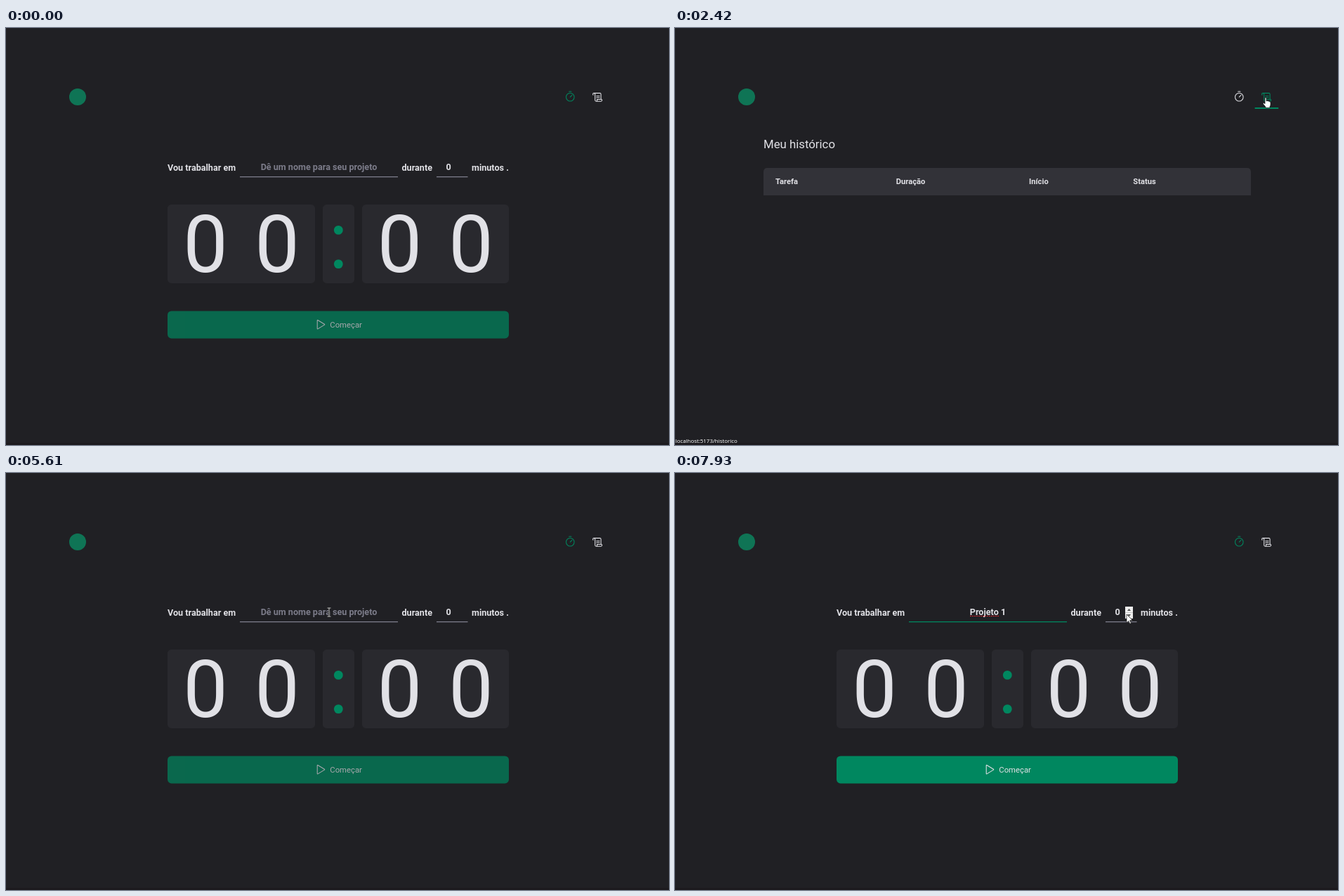
An HTML page that plays this animation: 944x593 px, repeating every 8000 ms.

```html
<!DOCTYPE html>
<html lang="pt-BR">
<head>
<meta charset="utf-8">
<title>Timer</title>
<style>
html, body { margin: 0; height: 100%; overflow: hidden; background: #202024; }
svg { display: block; width: 944px; height: 593px; font: 12.6px Roboto, sans-serif; fill: #e1e1e6; }
.bold { font-weight: 700; }
.mid { text-anchor: middle; }
.icon { fill: none; stroke: #e1e1e6; stroke-width: 16; stroke-linecap: round; stroke-linejoin: round; }
.icon.active { stroke: #00875f; }
.card { fill: #29292e; }
.green { fill: #00875f; }
.gray { fill: #7c7c8a; }
.digits { font-size: 113px; }
.ui { font-family: "Open Sans", "Noto Sans", sans-serif; fill: #fff; }
</style>
</head>
<body>
<svg viewBox="0 0 944 593">
  <rect y="590" width="944" height="3" fill="#1c1a1e"/>
  <circle cx="102" cy="98" r="12" fill="#0f7455"/>

  <g id="timerIcon" class="icon" transform="translate(794.9 89.8) scale(.0656)">
    <circle cx="128" cy="128" r="88"/>
    <path d="M128 128L167.6 88.4M104 8H152"/>
  </g>
  <g id="scrollIcon" class="icon" transform="translate(834 90) scale(.0656)">
    <path d="M104 104H168M104 136H168M48 40H176a24 24 0 0 1 24 24V176M32 80s-8-6-8-16a24 24 0 0 1 48 0V192a24 24 0 0 0 48 0c0-10-8-16-8-16H216s8 6 8 16a24 24 0 0 1-24 24H96"/>
  </g>
  <rect id="navLine" class="green" y="113" width="33.6" height="2"/>

  <g id="home">
    <g class="bold">
      <text x="230" y="202.5">Vou trabalhar em</text>
      <text x="563.5" y="202.5">durante</text>
      <text x="663" y="202.5">minutos .</text>
      <text x="630" y="202" class="mid">0</text>
      <text id="task" x="445.5" y="202" class="mid"></text>
    </g>
    <rect id="taskLine" x="333" y="211" width="225" height="1.3"/>
    <rect class="gray" x="613" y="211" width="44.5" height="1.3"/>
    <path id="spell" d="M420 203.5H461" stroke="#d8222c" stroke-width="1" stroke-dasharray="2 1"/>
    <rect id="caret" y="190.5" width="1" height="15"/>

    <g class="card">
      <rect x="230" y="251" width="210" height="112" rx="5.6"/>
      <rect x="451" y="251" width="45" height="112" rx="5.6"/>
      <rect x="507" y="251" width="209" height="112" rx="5.6"/>
    </g>
    <g class="digits mid">
      <text x="284" y="347">0</text>
      <text x="386" y="347">0</text>
      <text x="560.5" y="347">0</text>
      <text x="662" y="347">0</text>
    </g>
    <circle class="green" cx="473.3" cy="287.4" r="6.4"/>
    <circle class="green" cx="473.3" cy="335.6" r="6.4"/>

    <g id="button">
      <rect class="green" x="230" y="402.4" width="486" height="39" rx="5.6"/>
      <path class="icon" transform="translate(438.5 413.3) scale(.0656)" d="M72 39.9V216.1a8 8 0 0 0 12.1 6.7l144.1-88a8 8 0 0 0 0-13.6l-144.1-88a8 8 0 0 0-12.1 6.7Z"/>
      <text x="461.3" y="425.6" font-size="11.3">Começar</text>
    </g>

    <g id="popup">
      <rect x="400" y="220" width="61" height="81" rx="3" fill="#000" opacity=".18"/>
      <path d="M401 222q0-2 2-2h9l5-6 5 6h36q2 0 2 2v75q0 2-2 2h-55q-2 0-2-2z" fill="#27282b"/>
      <rect id="row" x="401" y="221" width="59" height="25.5" fill="#3c3c3e"/>
      <g class="ui" font-size="8.6">
        <text x="409.5" y="237.3">Projeto 1</text>
        <text x="409.5" y="262.4">Projeto 2</text>
        <text x="409.5" y="287.5">Projeto 3</text>
      </g>
    </g>
    <g id="spinner">
      <rect x="641" y="190" width="11" height="17" fill="#efefef"/>
      <path d="M644 196l2.5-3 2.5 3zM644 201l2.5 3 2.5-3z" fill="#505050"/>
      <path d="M641 198.5H652" stroke="#c8c8c8"/>
    </g>
  </g>

  <g id="history">
    <text x="126" y="171" font-size="16.8">Meu histórico</text>
    <path d="M126 238V204.6q0-5.6 5.6-5.6H814.4q5.6 0 5.6 5.6V238z" fill="#323238"/>
    <g class="bold" font-size="11.2">
      <text x="143" y="222">Tarefa</text>
      <text x="314.7" y="222">Duração</text>
      <text x="504" y="222">Início</text>
      <text x="652.3" y="222">Status</text>
    </g>
  </g>

  <g id="status" class="ui" font-size="7.9">
    <path id="bubble" d="M0 580H91q3 0 3 3V593H0z" fill="#2c2c2f"/>
    <text id="url" x=".7" y="590"></text>
  </g>

  <g id="pointer">
    <path id="arrow" d="M0 0V12L2.8 9.4 4.7 13.4 6.5 12.6 4.7 8.7H8.6z" fill="#fff" stroke="#111" stroke-width=".7"/>
    <path id="hand" d="M-1 1Q0-.6 1 1V5.5L2 5Q3 4.6 3.4 5.6 4.6 5 5.2 6.2 7 5.8 7 7.6V10.5Q7 12 6 13V15H-.2V13.6L-3.6 9.4Q-4.2 7.8-2.6 8L-1 9.2z" fill="#fff" stroke="#111" stroke-width=".7"/>
    <g id="beam" fill="none">
      <path d="M-2.5-6H2.5M0-6V6M-2.5 6H2.5" stroke="#111" stroke-width="2"/>
      <path d="M-2.5-6H2.5M0-6V6M-2.5 6H2.5" stroke="#ccc" stroke-width="1"/>
    </g>
  </g>
</svg>
<script>
const $ = id => document.getElementById(id);
const show = (id, on) => $(id).style.display = on ? "" : "none";
const clamp = v => Math.max(0, Math.min(1, v));

// pointer path: time, x, y
const path = [
  [70, 918, 578], [400, 913, 546], [820, 903, 514], [1250, 866, 345], [1660, 827, 191],
  [1900, 836, 125], [2140, 841, 98.5], [2610, 841, 98.5], [2950, 836, 97.5],
  [3150, 836, 97.5], [3360, 825, 90], [3570, 818, 95], [3850, 818, 95], [4320, 533, 170],
  [4670, 461, 197], [4740, 461, 197], [5010, 461, 196], [5610, 460, 198], [6350, 460, 198],
  [6560, 458, 224], [6850, 445, 231], [7130, 444, 231], [7500, 540, 218], [7860, 643, 201], [8000, 643, 201]
];

function pointerAt(t) {
  let i = 1;
  while (i < path.length - 1 && path[i][0] < t) i++;
  const [t0, x0, y0] = path[i - 1], [t1, x1, y1] = path[i];
  const k = clamp((t - t0) / (t1 - t0));
  return [x0 + (x1 - x0) * k, y0 + (y1 - y0) * k];
}

function draw(t) {
  const [x, y] = pointerAt(t);
  const inside = (l, top, r, b) => x >= l && x <= r && y >= top && y <= b;
  const onTimer = inside(787, 81, 821, 115), onScroll = inside(825, 81, 860, 115);
  const onTask = inside(333, 186, 558, 212);
  const onHistory = t >= 2420 && t < 3640;
  const focused = t >= 5950, typed = t >= 6020, chosen = t >= 7040;

  show("home", !onHistory);
  show("history", onHistory);
  $("timerIcon").classList.toggle("active", !onHistory);
  $("scrollIcon").classList.toggle("active", onHistory);
  show("navLine", onTimer || onScroll);
  $("navLine").setAttribute("x", onTimer ? 786.6 : 825.6);

  $("task").textContent = chosen ? "Projeto 1" : typed ? "p" : "Dê um nome para seu projeto";
  $("task").setAttribute("class", typed ? "mid" : "mid gray");
  $("taskLine").setAttribute("class", focused ? "green" : "gray");
  $("button").setAttribute("opacity", typed ? 1 : .7);
  show("spell", chosen);
  show("caret", typed && !chosen);
  $("caret").setAttribute("x", 449);

  show("popup", t >= 6090 && t < 7250);
  $("popup").setAttribute("opacity", clamp((7250 - t) / 200));
  show("row", inside(401, 220, 460, 246));
  show("spinner", inside(613, 186, 658, 212));

  show("status", t >= 2000 && t < 4600);
  $("status").setAttribute("opacity", t < 2420 ? clamp((t - 1960) / 440) : clamp((4600 - t) / 150));
  show("bubble", t < 2420);
  $("url").textContent = t < 3360 ? "localhost:5173/historico" : "localhost:5173";

  show("pointer", t >= 70 && !(typed && t < 6350));
  $("pointer").setAttribute("transform", `translate(${x} ${y})`);
  const hand = onTimer || onScroll;
  show("hand", hand);
  show("beam", onTask);
  show("arrow", !hand && !onTask);
}

const start = performance.now();
function tick() {
  draw((performance.now() - start) % 8000);
  requestAnimationFrame(tick);
}
tick();
</script>
</body>
</html>
```
